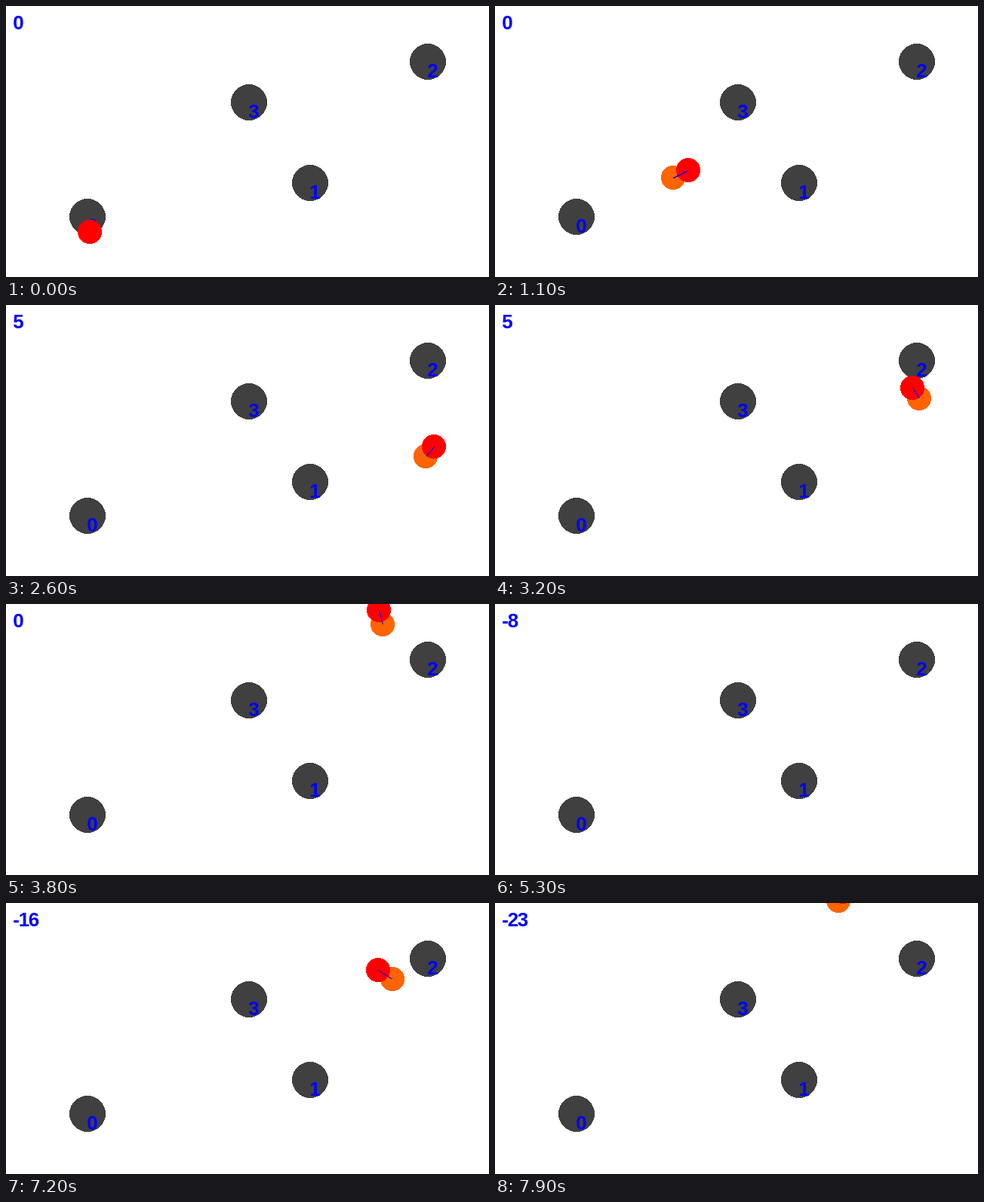
Recreate the animation shown at these times as an HTML page. Size 640 px wide and 360 px high, loop 8000 ms.

```html
<!DOCTYPE html>
<html lang="en">
<head>
<meta charset="utf-8">
<title>Checkpoint run</title>
<style>
  html, body { margin: 0; width: 100%; height: 100%; overflow: hidden; background: #fff; }
  svg { display: block; width: 100%; height: 100%; }
  text { font: bold 26px "Liberation Sans", Arial, sans-serif; letter-spacing: -1.3px; fill: #00f; }
  circle, line { shape-rendering: crispEdges; }
  .gate { fill: #404040; }
  .tail { fill: #ff6400; }
  .pod { fill: #f00; }
  line { stroke: #00f; stroke-width: 1; }
</style>
</head>
<body>
<svg id="stage" viewBox="0 0 640 360"></svg>
<script>
const STEP = 100, STEPS = 80;
const DRAG = 0.85, THRUST = 4;
const GATES = [[108, 280], [403, 235], [559, 74], [322, 128]];

// Turning points after the straight launch, with the velocity per step
const TURNS = [
  { n: 11, p: [256, 218], v: [20.2, -8.8] },
  { n: 18, p: [407.5, 215.7], v: [22.4, 5] },
  { n: 26, p: [567, 188], v: [9.2, -14.5] },
  { n: 35, p: [518, 64], v: [-11.8, -18] },
  { n: 38, p: [494, 8], v: [-3.8, -19.5] },
  { n: 51, p: [730, -100], v: [18, 12] },
  { n: 64, p: [653, 139.5], v: [-21, 0] },
  { n: 72, p: [493, 89], v: [-18.6, -13] },
  { n: 79, p: [461, -15], v: [7.5, -10.7] }
];

// A gate earns points; each step of a stray stretch costs one
const GATE_HIT = 18, REWARD = 5;
const STRAYS = [[34, 45], [53, 58], [70, 79]];

const stage = document.getElementById("stage");

function set(el, attrs) {
  for (const key in attrs) el.setAttribute(key, attrs[key]);
}

function add(tag, attrs, label) {
  const el = document.createElementNS("http://www.w3.org/2000/svg", tag);
  set(el, attrs);
  if (label !== undefined) el.textContent = label;
  return stage.appendChild(el);
}

function addText(x, y, label) {
  return add("text", { x: x - 0.7, y: y + 20.5 }, label);
}

// Constant thrust against drag, from rest
function launch(n) {
  const k = 1 - DRAG;
  const d = THRUST / k * (n - DRAG / k * (1 - DRAG ** n));
  return [111 + 0.863 * d, 300 - 0.4922 * d];
}

// Cubic Hermite curve between two turning points
function cruise(n) {
  const i = TURNS.findIndex(turn => turn.n >= n);
  const a = TURNS[i - 1], b = TURNS[i];
  const span = b.n - a.n, u = (n - a.n) / span, w = 1 - u;
  return [0, 1].map(k =>
    w * w * ((1 + 2 * u) * a.p[k] + u * span * a.v[k]) +
    u * u * ((1 + 2 * w) * b.p[k] - w * span * b.v[k]));
}

function place(n) {
  return (n <= TURNS[0].n ? launch(n) : cruise(n)).map(Math.round);
}

function points(n) {
  return STRAYS.reduce(
    (sum, [from, to]) => sum - Math.max(0, Math.min(n, to) - from + 1),
    n >= GATE_HIT ? REWARD : 0);
}

GATES.forEach(([cx, cy], i) => {
  add("circle", { class: "gate", cx, cy, r: 24 });
  addText(cx, cy, i);
});
const tail = add("circle", { class: "tail", r: 16 });
const pod = add("circle", { class: "pod", r: 16 });
const link = add("line", { transform: "translate(0.5 0.5)" });
const score = addText(10, 10, 0);

let shown = -1;

function draw(n) {
  const [x1, y1] = place(Math.max(n - 1, 0));
  const [x2, y2] = place(n);
  set(tail, { cx: x1, cy: y1 });
  set(pod, { cx: x2, cy: y2 });
  set(link, { x1, y1, x2, y2 });
  score.textContent = points(n);
  shown = n;
}

const start = performance.now();

function tick() {
  const n = Math.floor((performance.now() - start) / STEP) % STEPS;
  if (n !== shown) draw(n);
  requestAnimationFrame(tick);
}

draw(0);
requestAnimationFrame(tick);
</script>
</body>
</html>
```
